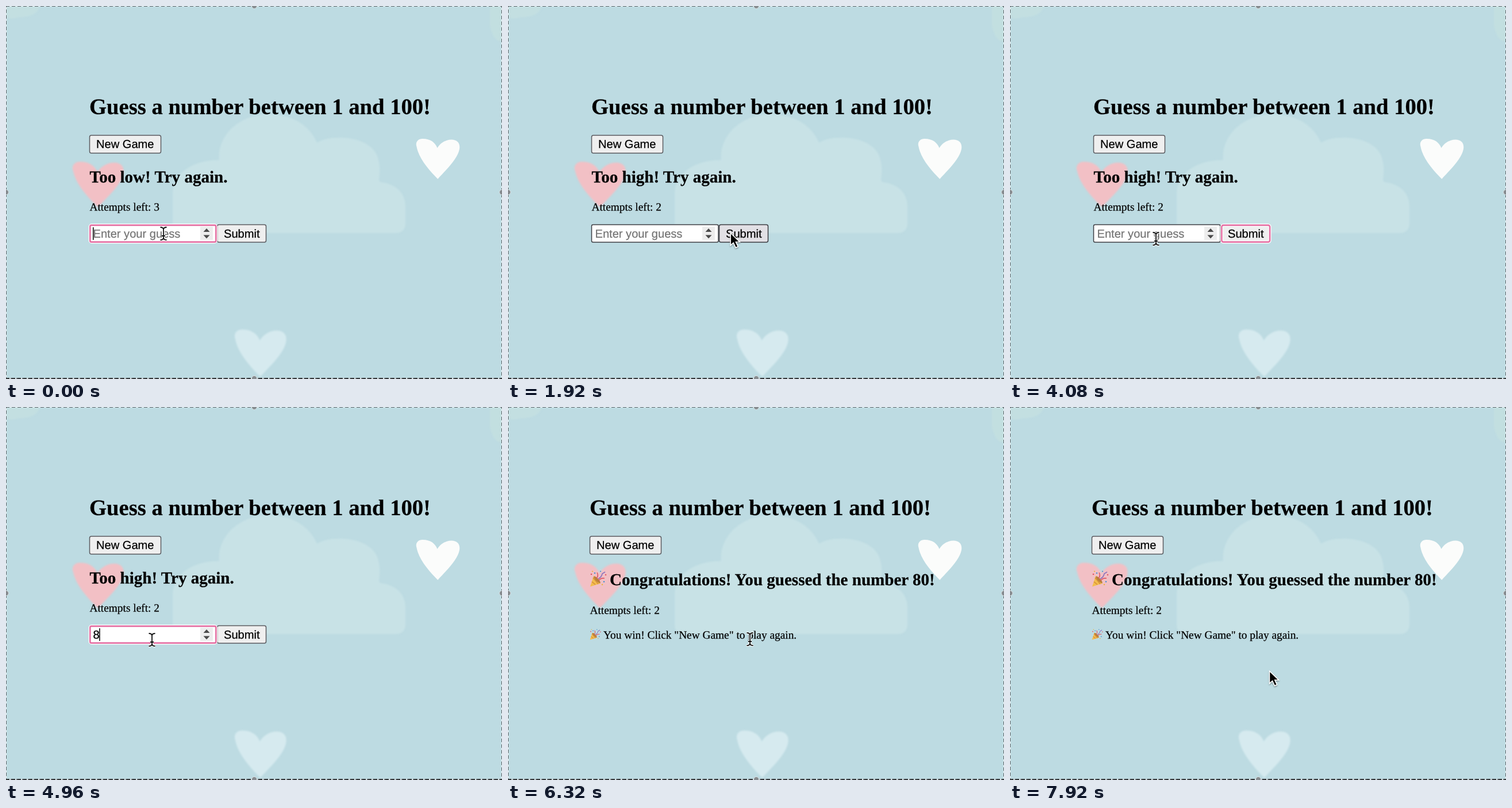
An HTML page that plays this animation: 863 by 649 pixels, repeating every 8 s.

```html
<!DOCTYPE html>
<html lang="en">
<head>
<meta charset="utf-8">
<title>Guess a number</title>
<style>
html, body { margin: 0; width: 100%; height: 100%; overflow: hidden; background: #bddbe2; }
svg { display: block; width: 863px; height: 649px; }
text { font-family: "Liberation Serif", "Times New Roman", serif; font-size: 19.35px; text-rendering: geometricPrecision; white-space: pre; stroke: currentColor; stroke-width: .25; }
.h1 { font-size: 38.65px; font-weight: bold; }
.h2 { font-size: 29.05px; font-weight: bold; }
.ui { font-family: "Liberation Sans", Arial, sans-serif; font-size: 20.1px; }
.box { fill: #efefef; stroke: #5b5b60; stroke-width: 1.5; }
.ring { fill: none; stroke: #fff; stroke-width: 5.2; }
.ring + .ring { stroke: #e573a5; stroke-width: 2.7; }
.dash { fill: none; stroke: #e4edef; stroke-width: 2; }
.dash + .dash { stroke: #62666a; stroke-dasharray: 6 4; }
</style>
</head>
<body>
<svg viewBox="0 0 863 649">
  <defs>
    <path id="heart" d="M50 100C32 80 7 50 2 20C-2 8 6-1 16 0C33 0 44 9 49 23C55 11 68 2 81 2C95 2 102 12 99 27C94 52 68 78 50 100Z"/>
    <g id="party">
      <path d="M1 28.500L7 10Q15 13 19 23Z" fill="#f3bd4e"/>
      <path d="M4 20L10 25M6 13L15 24" stroke="#d58d3a" stroke-width="1.500"/>
      <ellipse cx="13" cy="16.500" rx="2.500" ry="8" transform="rotate(-43 13 16.500)" fill="#b9813b"/>
      <path d="M12 14Q16 10 13 4M16 18Q19 13 26 14" fill="none" stroke="#df5a66" stroke-width="1.600"/>
      <path d="M15 15Q21 12 22 6L27 3" fill="none" stroke="#8b73bd" stroke-width="1.600"/>
      <g fill="#4b91cf"><circle cx="9" cy="5" r="1.300"/><circle cx="25" cy="20" r="1.300"/><circle cx="19" cy="2" r="1.100"/></g>
      <g fill="#e25562"><circle cx="3" cy="7" r="1.300"/><circle cx="28" cy="8" r="1.200"/></g>
      <g fill="#e9b63c"><circle cx="5" cy="2" r="1.100"/><circle cx="22" cy="25" r="1.200"/></g>
    </g>
    <filter id="soft" x="-10%" y="-10%" width="120%" height="120%"><feGaussianBlur stdDeviation="1.500"/></filter>
    <filter id="edge"><feGaussianBlur stdDeviation=".8"/></filter>
    <filter id="shade" x="-50%" y="-50%" width="200%" height="200%"><feDropShadow dx="0" dy="1.500" stdDeviation="1.300" flood-opacity=".4"/></filter>
  </defs>

  <rect width="863" height="649" fill="#bddbe2"/>
  <g filter="url(#soft)">
    <path d="M303 395Q290 394 290 378V325C292 290 325 268 371 268C367 232 398 190 456 188C500 189 528 208 541 238C565 222 640 225 648 268C653 285 648 298 650 306C682 310 696 328 695 352V380Q693 395 678 395Z" fill="#c8e2e6"/>
    <path d="M0 0H58Q56 19 20 20Q8 24 0 20Z" fill="#c3dfe1"/>
    <path d="M842 0H863V62Q848 62 842 35Z" fill="#c2dfe0"/>
    <use href="#heart" transform="translate(115 271) scale(.9 .79)" fill="#f2c0c5"/>
    <use href="#heart" transform="translate(397 563) scale(.91 .82)" fill="#d6eaef"/>
  </g>
  <use href="#heart" transform="translate(713 231) scale(.765 .7)" fill="#fbfcfb" filter="url(#edge)"/>

  <rect class="dash" x="0" y="0" width="863" height="648"/>
  <rect class="dash" x="0" y="0" width="863" height="648"/>
  <path d="M0 648H863" stroke="#34383b" stroke-width="2" stroke-dasharray="6 4"/>
  <g fill="#858a8e" stroke="#d9e0e2">
    <circle cx="432" cy="0" r="4.500"/><circle cx="432" cy="648" r="4.500"/>
    <circle cx="0" cy="324" r="4.500"/><circle cx="863" cy="324" r="4.500"/>
  </g>

  <g id="head">
    <text class="h1" x="145" y="188">Guess a number between 1 and 100!</text>
    <rect class="box" x="145.500" y="225" width="124" height="31" rx="3"/>
    <text class="ui" x="157" y="247">New Game</text>
  </g>

  <g id="play">
    <text class="h2" id="hint" x="145.500" y="307"></text>
    <text id="left" x="145.500" y="356"></text>
    <rect x="145.500" y="380.500" width="220.500" height="30.500" rx="2.500" fill="#fff" stroke="#3f3f44" stroke-width="1.500"/>
    <rect class="box" id="button" x="367.500" y="380.500" width="85" height="30.500" rx="3"/>
    <g id="fieldRing">
      <rect class="ring" x="146.300" y="381.300" width="219" height="29.400" rx="2.500"/>
      <rect class="ring" x="146.300" y="381.300" width="219" height="29.400" rx="2.500"/>
    </g>
    <g id="buttonRing">
      <rect class="ring" x="368.300" y="381.300" width="83.800" height="29.400" rx="3"/>
      <rect class="ring" x="368.300" y="381.300" width="83.800" height="29.400" rx="3"/>
    </g>
    <rect x="338" y="384" width="22" height="23" fill="#ededed"/>
    <path d="M343.500 393L349 387L354.500 393ZM343.500 398.500L349 404.500L354.500 398.500Z" fill="#4a4a4a"/>
    <text class="ui" id="entry" x="151.500" y="402.500"></text>
    <rect id="caret" y="385" width="1.500" height="22"/>
    <text class="ui" x="379" y="402.500">Submit</text>
  </g>

  <g id="win">
    <use href="#party" transform="translate(142 284)"/>
    <text class="h2" x="177" y="310">Congratulations! You guessed the number 80!</text>
    <text x="142.500" y="360">Attempts left: 2</text>
    <use href="#party" transform="translate(142 386) scale(.67)"/>
    <text x="166" y="403">You win! Click "New Game" to play again.</text>
  </g>

  <g id="beam" fill="none">
    <path d="M-6-11Q0-11 0-7Q0-11 6-11M0-8V8M-6 11Q0 11 0 7Q0 11 6 11M-3 4H3" stroke="#fff" stroke-width="4"/>
    <path d="M-5.500-11Q0-11 0-7Q0-11 5.500-11M0-8V8M-5.500 11Q0 11 0 7Q0 11 5.500 11M-3 4H3" stroke="#111" stroke-width="1.800"/>
  </g>
  <path id="arrow" d="M.5.5V22L5.500 17.500L9.500 26L13.500 24.200L9.700 16H16.500Z" stroke="#fff" stroke-width="1.500" filter="url(#shade)"/>
</svg>
<script>
const $ = id => document.getElementById(id);
const show = (id, on) => $(id).setAttribute("display", on ? "inline" : "none");
const LOOP = 8000, STEP = 80;
const FIRST_CLICK = 1680, KEY_ON_BUTTON = 3600, REFOCUS = 4480, WIN = 6240;

// time, x, y of the pointer
const path = [
  [0, 274, 396], [800, 274, 396], [1200, 392, 394], [1840, 392, 394],
  [2480, 268, 404], [3520, 268, 404], [3920, 254, 405], [5120, 254, 405],
  [5520, 389, 402], [6160, 389, 402], [6320, 421, 404], [6880, 451, 459], [LOOP, 451, 459]
];
// time, field content
const typing = [[0, ""], [640, "8"], [800, "82"], [FIRST_CLICK, ""], [REFOCUS, ""], [4880, "8"], [5040, "80"]];

function pointerAt(t) {
  const i = path.findIndex(p => p[0] > t);
  const [t0, x0, y0] = path[i - 1], [t1, x1, y1] = path[i];
  const u = (t - t0) / (t1 - t0), e = u * u * (3 - 2 * u);
  return [x0 + (x1 - x0) * e, y0 + (y1 - y0) * e];
}

function draw(t) {
  const won = t >= WIN, guessed = t >= FIRST_CLICK;
  const focused = !guessed || t >= REFOCUS;
  const [since, value] = typing.filter(k => k[0] <= t).pop();
  const [x, y] = pointerAt(t);

  show("play", !won);
  show("win", won);
  $("head").setAttribute("transform", `translate(${won ? -3 : 0})`);
  $("hint").textContent = `Too ${guessed ? "high" : "low"}! Try again.`;
  $("left").textContent = `Attempts left: ${guessed ? 2 : 3}`;

  const ink = value ? "#000" : "#757575";
  $("entry").textContent = value || "Enter your guess";
  $("entry").setAttribute("fill", ink);
  $("entry").style.color = ink;
  show("fieldRing", focused);
  show("buttonRing", t >= KEY_ON_BUTTON && t < REFOCUS);
  $("caret").setAttribute("x", 151 + value.length * 11.18);
  show("caret", focused && (t - since) % 1000 < 500);

  const hover = x > 367 && x < 453 && y > 380 && y < 412;
  $("button").style.fill = hover ? "#e2e0e5" : "";
  $("button").style.stroke = hover ? "#3c3c42" : "";

  const beam = won ? y < 412 : x < 367;
  show("beam", beam);
  show("arrow", !beam);
  $(beam ? "beam" : "arrow").setAttribute("transform", `translate(${x} ${y})`);
}

const start = performance.now();
function tick(now) {
  const t = Math.max(0, now - start) % LOOP;
  draw(Math.floor(t / STEP) * STEP);
  requestAnimationFrame(tick);
}
tick(start);
</script>
</body>
</html>
```
